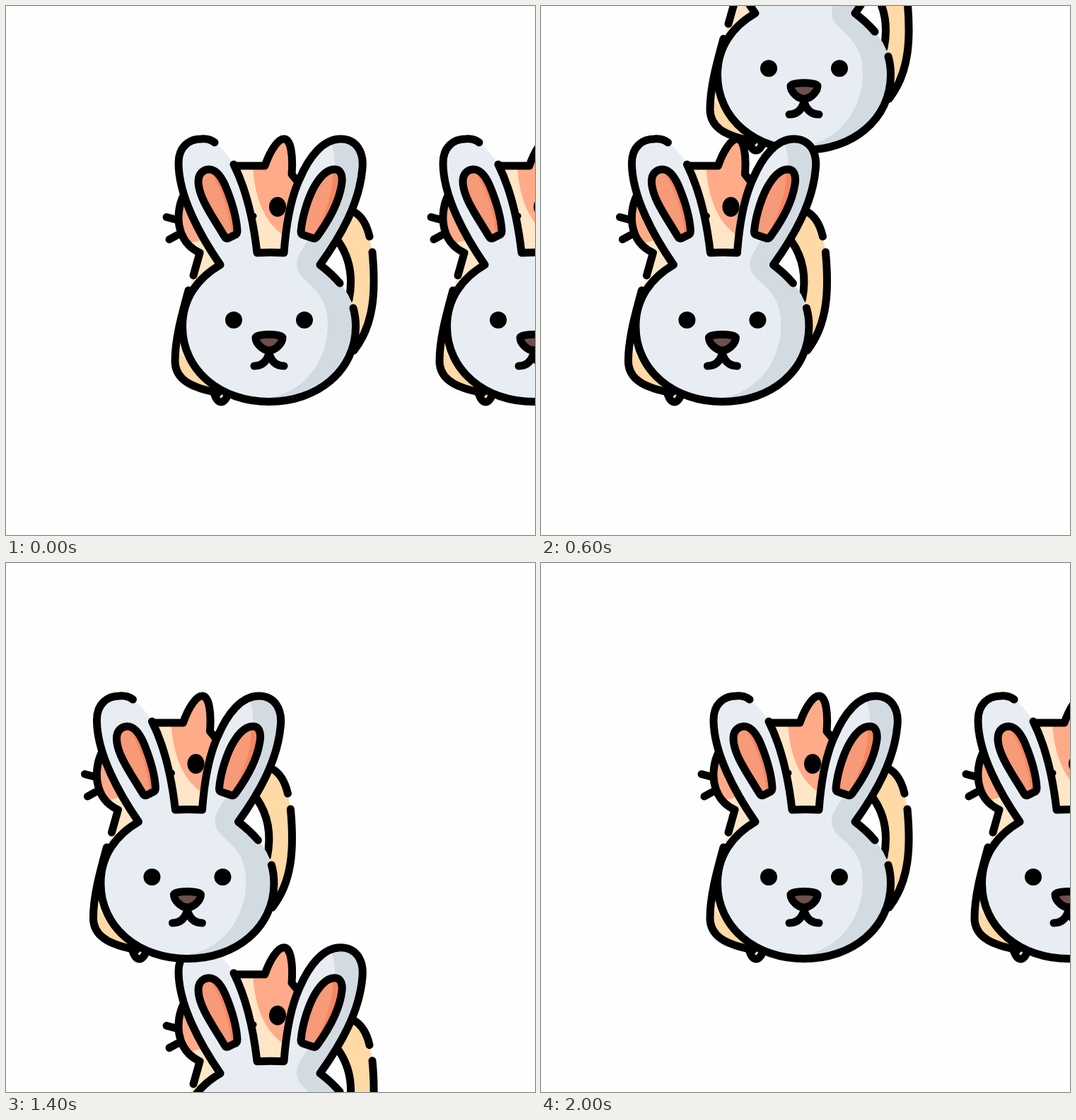
An HTML page without scripts for the animation above (2.1 s loop, 748 by 748 pixels).

```html
<!DOCTYPE html>
<html lang="en">
<head>
<meta charset="utf-8">
<title>Bunny swing</title>
<style>
  @property --turn {
    syntax: "<angle>";
    inherits: true;
    initial-value: 0deg;
  }
  html, body { margin: 0; height: 100%; overflow: hidden; background: #fefefe; }
  svg {
    display: block;
    width: 100%;
    height: 100%;
    animation: turn 2.1s steps(21) infinite;
  }
  /* 18 degrees per 100 ms; the closing pose repeats the first */
  @keyframes turn {
    from { --turn: 0deg; }
    to { --turn: 378deg; }
  }
  .rise { transform: translateY(calc(-374px * sin(var(--turn)))); }
  .slide { transform: translateX(calc(374px * cos(var(--turn)))); }

  .line { fill: none; stroke: #000; stroke-width: 11; stroke-linecap: round; stroke-linejoin: round; }
  .cream { fill: #ffe6c6; }
  .tan { fill: #ffd9a6; }
  .patch { fill: #ffab89; }
  .fur { fill: #e8edf4; }
  .shade { fill: #d3dbe2; }
  .pink { fill: #f79a78; }
  .rose { fill: #f58661; }
  .nose { fill: #6f4f4d; }
</style>
</head>
<body>
<svg viewBox="0 0 748 748">
  <defs>
    <path id="coat" d="M303 366C276 327 244 270 244 222C244 200 258 188 276 188Q287 187 295 193Q311 205 322 224C341 262 350 305 355 349H393C396 309 402 273 415 245C429 212 449 188 473 188C496 188 506 207 504 229C500 280 472 327 444 366L472 392Q486 408 491 427Q494.500 439 494.500 453C494.500 516 440 559.500 372 559.500S249.500 516 249.500 453C249.500 415 270 385 303 366Z"/>
    <path id="ear-l" d="M309 326C293 299 272 271 272 248C272 237 279 231 287 231C299 231 306 245 310 254C320 278 326 300 327 318Q327 323 323 324L315 328Q311 330 309 326Z"/>
    <path id="ear-r" d="M417 319C419 295 429 265 440 249C448 237 456 231 465 231C473 231 476 239 475 249C472 275 456 304 440 326Q437 330 433 328L421 324Q417 323 417 319Z"/>
    <clipPath id="in-coat"><use href="#coat"/></clipPath>
    <clipPath id="in-l"><use href="#ear-l"/></clipPath>
    <clipPath id="in-r"><use href="#ear-r"/></clipPath>

    <g id="cat">
      <path class="tan" d="M492 291Q508 302 514 326L518 348C523 402 521 452 488 492L478 420Q497 385 470 330Z"/>
      <path class="cream" d="M322 226H366L404 238L420 260V355H300Z"/>
      <path class="cream" d="M249 270C240 290 239 325 274 349L265 381L258 402L300 420L330 330Z"/>
      <path class="patch" d="M249 270C240 290 240 318 255 335Q271 335 285 326L270 270Z"/>
      <path class="patch" d="M349 226H366C373 206 384 188 393 188C403 188 406 212 404 238L420 255L396 326C365 309 351 268 349 226Z"/>
      <path class="tan" d="M258 402C249 435 239 470 239 502C239 532 270 541 300 547L320 500Z"/>
      <path class="cream" d="M242 486Q262 514 296 528L268 450Z"/>
      <path class="cream" d="M294 547Q298 560 304 560T315 547Z"/>
      <ellipse cx="384" cy="284" rx="12" ry="14"/>
      <circle cx="350" cy="297" r="4.500"/>
      <g class="line">
        <path d="M322 226H366C373 206 384 188 393 188C403 188 406 212 404 238L413 249"/>
        <path d="M251 268C240 290 238 332 274 349L265 381"/>
        <path d="M227 298.500L240 302M231 330L242 324"/>
        <path d="M258 402C249 435 239 470 239 502C239 532 270 541 300 547"/>
        <path d="M294 547Q298 560 304 560T315 547"/>
        <path d="M492 291Q508 300 514 326M518 348C523 402 521 450 492 487M470 333C486 356 491 384 485 415"/>
      </g>
    </g>

    <g id="bunny">
      <use href="#coat" class="fur"/>
      <path class="shade" clip-path="url(#in-coat)" d="M457 188C471 213 466 250 447 295C431 333 411 346 411 366C411 392 455 394 455 450C455 504 419 547 372 554V570H510V180Z"/>
      <use href="#ear-l" class="pink"/>
      <path class="rose" clip-path="url(#in-l)" d="M287 231C305 258 318 295 319 330H340V225Z"/>
      <use href="#ear-r" class="pink"/>
      <path class="rose" clip-path="url(#in-r)" d="M461 228C466 258 453 292 432 332H490V225Z"/>
      <circle cx="322" cy="444" r="12"/>
      <circle cx="422" cy="444" r="12"/>
      <g class="line">
        <path d="M295 193Q287 187 276 188C258 188 244 200 244 222C244 270 276 327 303 366C270 385 249.500 415 249.500 453C249.500 516 304 559.500 372 559.500S494.500 516 494.500 453Q494.500 439 491 427"/>
        <path d="M322 224C341 262 350 305 355 349Q374 348 393 349C396 309 402 273 415 245C429 212 449 188 473 188C496 188 506 207 504 229C500 280 472 327 444 366Q460 378 472 392"/>
        <use href="#ear-l"/>
        <use href="#ear-r"/>
        <path class="nose" d="M353 469C353 463 391 463 391 469C391 477 381 487 372 487S353 477 353 469Z"/>
        <path d="M351 509Q367 509 372 491Q377 509 393 509M372 487V493"/>
      </g>
    </g>

    <g id="pair">
      <use href="#cat"/>
      <use href="#bunny"/>
    </g>
  </defs>

  <g class="rise"><use href="#pair"/></g>
  <g class="slide"><use href="#pair"/></g>
</svg>
</body>
</html>
```
